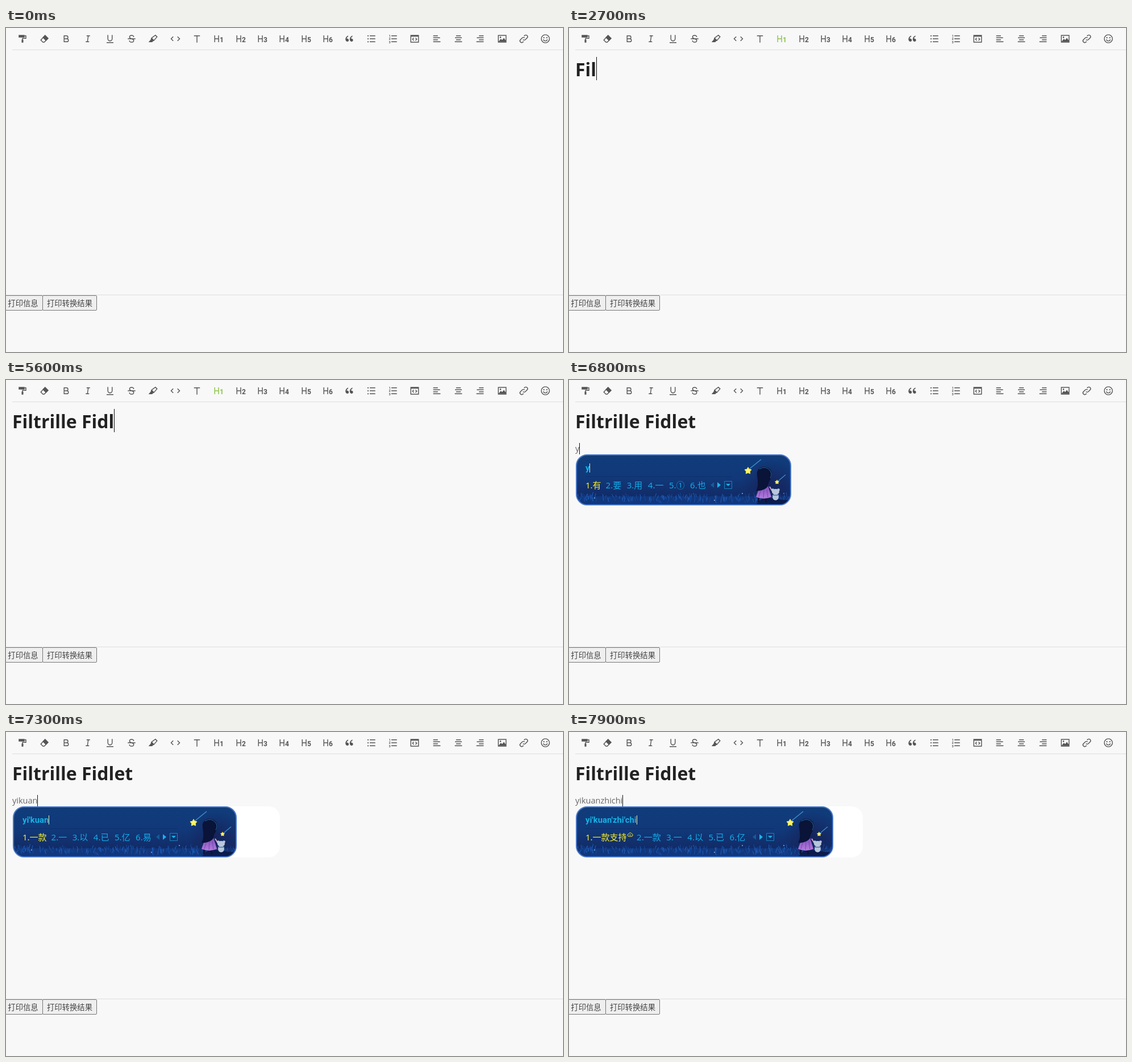
An HTML page for the animation above (8 s loop, 980 by 571 pixels).

```html
<!DOCTYPE html>
<html lang="zh">
<head>
<meta charset="utf-8">
<title>Rich text editor</title>
<style>
html, body { margin: 0; width: 100%; height: 100%; overflow: hidden; background: #f8f8f8; }
#stage { position: relative; width: 980px; height: 571px; overflow: hidden; font-family: "Open Sans", "Noto Sans", sans-serif; }
#stage > *, .caret { position: absolute; }
.rule { height: 1px; right: 0; background: #dedede; }
.icon { top: 10px; width: 18px; height: 18px; fill: none; stroke: #555; color: #555; stroke-width: 1.9; overflow: visible; }
.icon .f { fill: currentColor; stroke: none; }
.icon text { fill: currentColor; stroke: none; font: 700 16px Roboto, sans-serif; }
.icon .tiny { font-size: 7.5px; }
.line { left: 11px; white-space: pre; }
#head { top: 51px; font-size: 32px; font-weight: 700; line-height: 43px; color: #222; }
#para { font-size: 14.5px; line-height: 20px; color: #666; }
.caret { top: 0; width: 1px; background: #111; }
#head .caret { height: 41px; }
#para .caret { height: 20px; }
.btn { top: 471px; height: 27px; box-sizing: border-box; border: 1px solid #767676; border-radius: 2px; background: #efefef; color: #444; font: 300 13.333px/25px "Noto Sans CJK SC", "Noto Sans CJK", sans-serif; text-align: center; white-space: nowrap; }
#ghost, #panel { left: 12px; top: 131px; height: 90px; border-radius: 20px; box-sizing: border-box; }
#ghost { background: #fff; }
#panel { border: 2px solid #4a78c9; overflow: hidden; background: linear-gradient(#103c7a, #11397a 45%, #122f6c 72%, #0e2860); }
#panel > * { position: absolute; }
#grass { left: 0; top: 0; }
#art { right: 0; top: 0; }
#split { left: 15px; right: 102px; top: 37px; height: 1px; background: #0b3169; }
#typed { left: 15px; top: 12px; font: 700 14.8px/20px Roboto, sans-serif; color: #14b4e6; white-space: pre; }
#typed .caret { top: 2px; height: 16px; background: #f3f0a0; }
#words { left: 15px; top: 41px; display: flex; gap: 9.5px; font: 15px/22px "Noto Sans", "Noto Sans CJK SC", "Noto Sans CJK", sans-serif; color: #12ace6; white-space: nowrap; }
#words :first-child { color: #f6ee2c; margin-right: -1.5px; }
#words svg { width: 11px; height: 9px; vertical-align: 6px; margin-right: 1px; fill: none; stroke: #f6ee2c; }
#nav { right: 102px; top: 45px; }
</style>
</head>
<body>
<div id="stage">
  <div class="rule" style="left:11px;top:38px"></div>
  <div class="rule" style="left:0;top:470px"></div>
  <div class="btn" style="left:-5px;width:70px">打印信息</div>
  <div class="btn" style="left:64px;width:96px">打印转换结果</div>
  <div class="line" id="head"><span></span><i class="caret"></i></div>
  <div class="line" id="para"><span></span><i class="caret"></i></div>
  <div id="ghost"></div>
  <div id="panel">
    <svg id="grass" width="510" height="86"></svg>
    <svg id="art" width="100" height="86" viewBox="289 133 100 86">
      <defs>
        <radialGradient id="dusk"><stop offset="0" stop-color="#171f55" stop-opacity=".8"/><stop offset="1" stop-color="#171f55" stop-opacity="0"/></radialGradient>
        <linearGradient id="dress" x2="0" y2="1"><stop offset="0" stop-color="#7a4fb5"/><stop offset="1" stop-color="#b77be0"/></linearGradient>
      </defs>
      <ellipse cx="354" cy="184" rx="52" ry="44" fill="url(#dusk)"/>
      <path d="M317 157L338 140" stroke="#3f92cf" stroke-width="1.4"/>
      <path d="M368 178L381 167" stroke="#3f92cf" stroke-width="1.1"/>
      <path d="M330 219q8-14 25-11t34 4v7z" fill="#0b1c4c"/>
      <path d="M334 206l-1 9M346 208l1 8" stroke="#0c1538" stroke-width="3"/>
      <path d="M353 188l6 10" stroke="#c9a7bf" stroke-width="2"/>
      <path d="M336 186h14l6 20q-13 6-27 0z" fill="url(#dress)"/>
      <path d="M334 206l4-14M342 208l1-15M350 207l-2-14" stroke="#6c42a5" stroke-width=".8"/>
      <path d="M331 168c-2-8 4-15 12-15 9 0 15 7 14 14-1 9-7 12-7 20-4 7-16 9-21 8 5-8 3-17 2-27z" fill="#0a1338"/>
      <path d="M335 157q11-7 19 3 4 6 0 13" fill="none" stroke="#1d6d9c"/>
      <g fill="#b7c6db">
        <circle cx="358.500" cy="193.500" r="2.300"/><circle cx="368.500" cy="193.500" r="2.300"/>
        <ellipse cx="363.500" cy="197" rx="6.500" ry="5"/><ellipse cx="363.500" cy="206" rx="5.500" ry="6"/>
      </g>
      <path d="M358 203h11" stroke="#6f86b5" stroke-width="2"/>
    </svg>
    <div id="split"></div>
    <div id="typed"><span></span><i class="caret"></i></div>
    <div id="words"></div>
    <svg id="nav" width="38" height="14">
      <path d="M6 2v10L0 7z" fill="#145c98"/><path d="M12 2v10l6-5z" fill="#18b5ea"/>
      <path d="M24.500.500h13v13h-13z" fill="none" stroke="#1685bd"/><path d="M27 5h8l-4 4z" fill="#18b5ea"/>
    </svg>
  </div>
</div>
<script>
const $ = s => document.querySelector(s);
const stage = $('#stage');
const svg = (box, inner) => `<svg viewBox="${box}">${inner}</svg>`;
const line = d => `<path d="${d}"/>`;
const fill = d => `<path class="f" d="${d}"/>`;
const dot = (x, y, r) => `<circle class="f" cx="${x}" cy="${y}" r="${r}"/>`;
const heading = n => line('M3 4v16M12 4v16M3 12h9') + `<text x="14.500" y="20">${n}</text>`;
const quote = x => `<path class="f" transform="translate(${x})" d="M4.6 17.3C3.500 16.200 3 15 3 13c0-3.500 2.500-6.600 6-8.200l.9 1.400c-3.300 1.800-4 4.100-4.200 5.600.5-.3 1.200-.4 1.900-.3 1.800.2 3.200 1.600 3.200 3.500a3.500 3.500 0 0 1-3.500 3.500c-1 0-2-.5-2.700-1.200z"/>`;
const rows = 'M8 5h13M8 12h13M8 19h13';
// Four lines of text pushed left (0), centred (.5) or right (1)
const align = side => line([11, 16, 11, 17].map((w, i) => `M${3.5 + (17 - w) * side} ${5 + i * 4.7}h${w}`).join(''));

const icons = [
  fill('M3 3h14v6H3zM10 14h4v7h-4z') + line('M17 5h3v6h-8v4'),
  line('M13 4l7 7-9 9H8l-5-5z') + fill('M13 3l8 8-6 6-8-8z'),
  line('M7 5h5.500a3.500 3.500 0 0 1 0 7H7zM7 12h6.500a3.500 3.500 0 0 1 0 7H7z'),
  line('M9 5h8M7 19h8M13 5l-2 14'),
  line('M7 3v9a5 5 0 0 0 10 0V3M4 21h16'),
  line('M3 12h18M17 8c0-2.500-2-4-5-4S7.200 5.600 7.200 8s2 3.300 4.800 4 5 1.800 5 4-2 4-5 4-5.200-1.600-5.200-4'),
  line('M17 3.500l4 4-7 8-3 1-3.500-3.500 1-3z') + fill('M8 9l7 7-4 2-1 2H1l5-6z'),
  line('M17 7l5 5-5 5M7 7l-5 5 5 5'),
  line('M5 5h14M12 5v16'),
  ...[1, 2, 3, 4, 5, 6].map(heading),
  quote(0) + quote(10),
  line(rows) + [5, 12, 19].map(y => dot(4, y, 1.5)).join(''),
  line(rows) + [1, 2, 3].map(n => `<text class="tiny" x="2" y="${n * 7 + 1}">${n}</text>`).join(''),
  line('M3 4h18v16H3zM3 6h18M10 10l-3 3 3 3M14 10l3 3-3 3'),
  ...[0, .5, 1].map(align),
  line('M3 4h18v16H3z') + fill('M4 18l5-6 3 3 4-5 5 7v2H4z') + dot(8, 8.5, 1.7),
  line('M10 14a4 4 0 0 0 5.700 0l4-4a4 4 0 0 0-5.700-5.700l-1.500 1.500M14 10a4 4 0 0 0-5.700 0l-4 4a4 4 0 0 0 5.700 5.700l1.500-1.500'),
  '<circle cx="12" cy="12" r="9.500"/>' + line('M7.500 13.500a4.600 4.600 0 0 0 9 0') + dot(8.500, 9.500, 1.500) + dot(15.500, 9.500, 1.500)
];
icons.forEach((inner, i) => {
  stage.insertAdjacentHTML('beforeend', svg('0 0 24 24', inner));
  const el = stage.lastElementChild;
  el.setAttribute('class', 'icon');
  el.style.left = 20.4 + i * 38.33 + 'px';
});
const h1Icon = document.querySelectorAll('.icon')[9];

// Meadow and stars
let seed = 7;
const rand = () => (seed = seed * 16807 % 2147483647) / 2147483647;
let blades = '<path d="M0 72h510v14H0z" fill="#123f8c" opacity=".65"/>';
for (let i = 0; i < 300; i++) {
  const x = rand() * 510, y = 72 + rand() * 12, lean = rand() * 6 - 3;
  blades += `<path d="M${x.toFixed(1)} ${y.toFixed(1)}l${lean.toFixed(1)} ${(-4 - rand() * 4).toFixed(1)}" stroke="${rand() < .5 ? '#1e5fbd' : '#174a9c'}"/>`;
}
$('#grass').innerHTML = blades + [[31, 75], [242, 79], [291, 67], [364, 67]].map(([x, y]) => `<circle cx="${x}" cy="${y}" r="1" fill="#7fb9dc"/>`).join('');

const star = (cx, cy, r) => {
  const pts = Array.from({ length: 10 }, (_, i) => {
    const a = (i / 5 - .5) * Math.PI, q = i % 2 ? r * .55 : r;
    return `${(cx + q * Math.cos(a)).toFixed(1)},${(cy + q * Math.sin(a)).toFixed(1)}`;
  });
  return `<polygon points="${pts.join(' ')}" fill="#fff36a" stroke="#ffe94a" stroke-linejoin="round"/>`;
};
$('#art').insertAdjacentHTML('beforeend', star(315, 160, 6.3) + star(366, 180, 3.6));

// Typing steps: [time, text]
const draft = [[0, ''], [600, 'F'], [900, 'Fi'], [1100, 'Fil'], [1400, 'Fi'], [1500, 'F'], [1600, '']];
const title = 'Filtrille Fidlet';
const titleSteps = [[0, ''],
  ...[2300, 2500, 2700, 3200, 3300, 3500, 3700, 3800, 4000, 4200].map((t, i) => [t, title.slice(0, i + 1)]),
  [4700, 'Filtrille D'], [5000, 'Filtrille '],
  ...[5100, 5300, 5400, 5600].map((t, i) => [t, title.slice(0, i + 11)]),
  [5800, title]];
// Input panel: [time, pinyin, right edge, candidates]
const last = '一款支持* 一款 一 以 已 亿';
const imeSteps = [
  [6800, 'y', 391, '有 要 用 一 ① 也'],
  [6900, 'yi', 391, '一 以 已 亿 易 亦'],
  [7000, "yi'k", 482, '一款 一块 一开 一口 一看 亦可'],
  [7100, "yi'ku", 406, '一哭 一 以 已 亿 易'],
  [7200, "yi'kua", 406, '一跨 一 以 已 亿 易'],
  [7300, "yi'kuan", 406, '一款 一 以 已 亿 易'],
  [7400, "yi'kuan'z", 517, '一款在 一款做 一款最 一款 一块 一'],
  [7500, "yi'kuan'zh", 517, '一款中 一款这 一款只 一款 一块 一'],
  [7600, "yi'kuan'zhi", 465, '一款只 一款值 一款 一 以 已'],
  [7700, "yi'kuan'zhi'c", 465, last],
  [7800, "yi'kuan'zhi'ch", 465, last],
  [7900, "yi'kuan'zhi'chi", 465, last]];
const cloud = svg('0 0 11 9', '<path d="M3 8a2.300 2.300 0 0 1 0-4.500 3 3 0 0 1 5.500 0A2.300 2.300 0 0 1 8 8zM4 6q1.500-2 3 0"/>');

const at = (steps, t) => steps.filter(s => s[0] <= t).pop();
const show = (el, on) => { el.style.visibility = on ? 'visible' : 'hidden'; };
const clamp = v => Math.max(0, Math.min(1, v));
const mix = k => `rgb(${[[85, 139], [85, 195], [85, 74]].map(([a, b]) => Math.round(a + (b - a) * k)).join()})`;

function render(t) {
  const inHead = t >= 1900 && t < 6200;
  const ime = at(imeSteps, t);

  $('#head span').textContent = at(titleSteps, t)[1];
  show($('#head .caret'), inHead);
  $('#para').style.top = (t < 6200 ? 50 : 111) + 'px';
  $('#para span').textContent = ime ? ime[1].replaceAll("'", '') : at(draft, t)[1];
  show($('#para .caret'), t >= 300 && !inHead);

  const lit = clamp((t - 1800) / 400) - clamp((t - 6100) / 400);
  h1Icon.style.color = h1Icon.style.stroke = mix(lit);

  show($('#panel'), ime);
  show($('#ghost'), t >= 7100);
  $('#ghost').style.width = (t < 7400 ? 482 : 517) - 12 + 'px';
  if (!ime) return;
  $('#panel').style.width = ime[2] - 12 + 'px';
  $('#typed span').textContent = ime[1];
  $('#words').innerHTML = ime[3].split(' ').map((w, i) => `<span>${i + 1}.${w.replace('*', cloud)}</span>`).join('');
}

const start = performance.now();
let shown = -1;
function tick() {
  const t = Math.floor(Math.max(0, performance.now() - start) % 8000 / 100) * 100;
  if (t !== shown) render(shown = t);
  requestAnimationFrame(tick);
}
tick();
</script>
</body>
</html>
```
